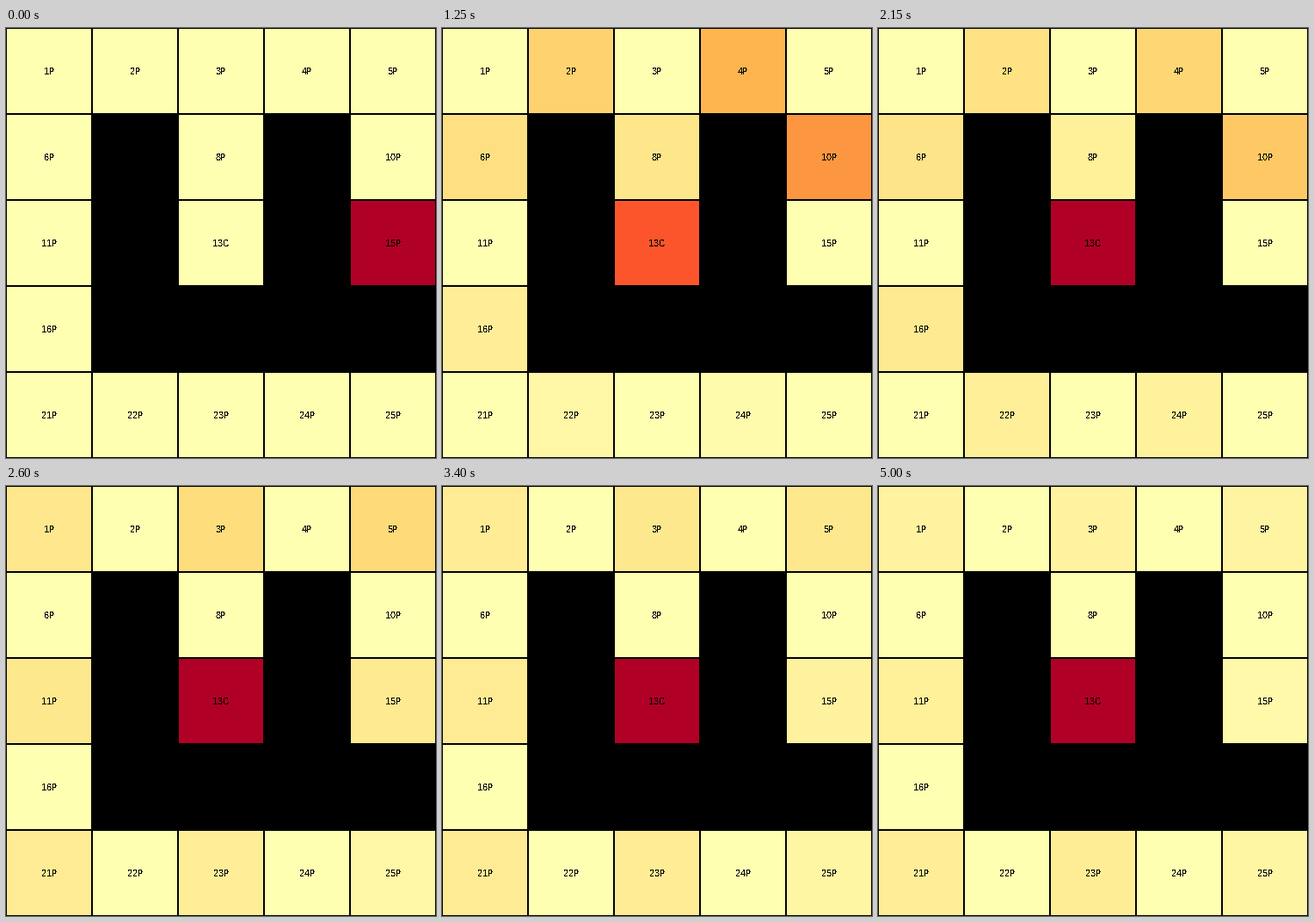
Animation, 500 px wide and 500 px high, one loop 5050 ms. Source, as a matplotlib script:

```python
import numpy as np
import matplotlib.pyplot as plt
from matplotlib.animation import FuncAnimation
from matplotlib.colors import LinearSegmentedColormap
from matplotlib.patches import Rectangle

plt.rcParams["text.hinting"] = "native"
plt.rcParams["text.hinting_factor"] = 1

SIZE, CELL, N = 500, 100, 5
STEPS, INTERVAL = 101, 50
MAX_PROB = 0.5
START, GOAL = 15, 13
WALLS = {7, 9, 12, 14, 17, 18, 19, 20}
ROOMS = [c for c in range(1, N * N + 1) if c not in WALLS]

heat = LinearSegmentedColormap.from_list(
    "heat",
    ["#ffffb2", "#fed976", "#feb24c", "#fd8d3c", "#fc4e2a", "#e31a1c", "#b10026"],
    N=1024,
)


def position(cell):
    return divmod(cell - 1, N)


def neighbours(cell):
    r, c = position(cell)
    return [n for n in ROOMS
            if abs(position(n)[0] - r) + abs(position(n)[1] - c) == 1]


def transition_matrix():
    """Random walk through the rooms; the goal room is absorbing."""
    m = np.zeros((len(ROOMS), len(ROOMS)))
    for i, cell in enumerate(ROOMS):
        exits = [GOAL] if cell == GOAL else neighbours(cell)
        for n in exits:
            m[i, ROOMS.index(n)] = 1 / len(exits)
    return m


def walk():
    p = np.zeros(len(ROOMS))
    p[ROOMS.index(START)] = 1
    m = transition_matrix()
    history = [p]
    for _ in range(STEPS - 1):
        history.append(history[-1] @ m)
    return np.array(history)


probs = walk()

fig = plt.figure(figsize=(5, 5), dpi=100, facecolor="black")
ax = fig.add_axes([0, 0, 1, 1])
ax.set_xlim(0, SIZE)
ax.set_ylim(SIZE, 0)
ax.axis("off")

tiles = []
for cell in ROOMS:
    row, col = position(cell)
    x, y = col * CELL, row * CELL
    tile = Rectangle((x + 1, y + 1), CELL - 2, CELL - 2, lw=0, antialiased=False)
    tiles.append(ax.add_patch(tile))
    ax.text(x + 50, y + 54, f"{cell}{'C' if cell == GOAL else 'P'}",
            family="Liberation Sans", size=11 * 72 / 100, color="black",
            ha="center", va="baseline", antialiased=False)


def draw(step):
    for tile, p in zip(tiles, probs[step]):
        tile.set_facecolor(heat(min(p / MAX_PROB, 1.0)))
    return tiles


anim = FuncAnimation(fig, draw, frames=STEPS, interval=INTERVAL,
                     repeat=True, repeat_delay=0)
plt.show()
```
